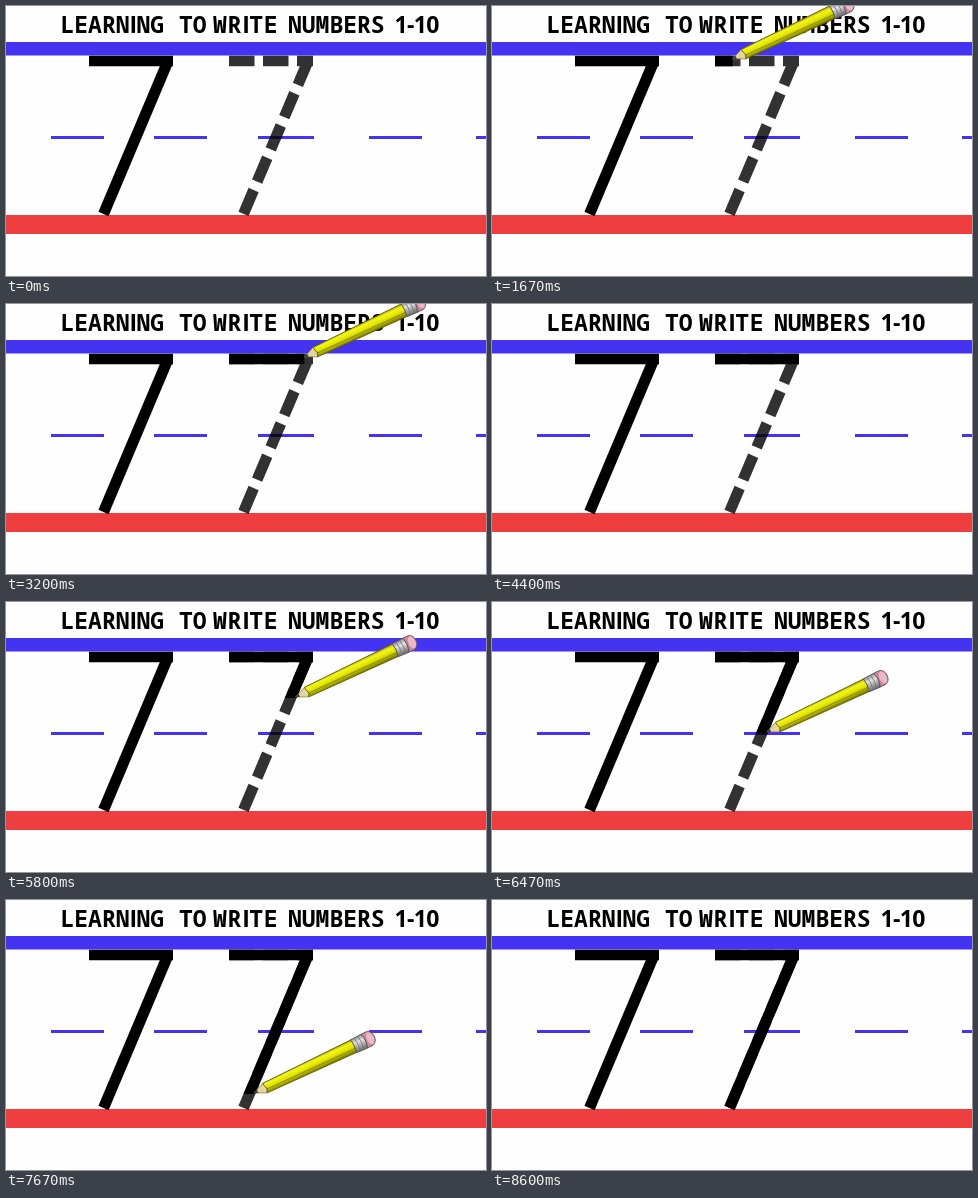
Recreate the animation shown at these times as an HTML page. Size 480 by 270 pixels, loop 8740 ms.

```html
<!DOCTYPE html>
<html lang="en">
<head>
<meta charset="utf-8">
<title>Writing the number 7</title>
<style>
  html, body { margin: 0; width: 100%; height: 100%; overflow: hidden; background: #fff; }
  svg { display: block; width: 100vw; height: 100vh; }
  .title { font: 600 23px "Noto Sans Mono", monospace; }
  .title .bold { font-weight: 700; }
  .title .sans { font-family: "Open Sans", sans-serif; font-weight: 700; letter-spacing: -.6px; }
  .seven path { fill: none; stroke: #000; }
</style>
</head>
<body>
<svg viewBox="0 0 480 270">
  <defs>
    <path id="bar" d="M83 55H167" stroke-width="10.5"/>
    <path id="slant" d="M162 55L97.5 208" stroke-width="11"/>
    <clipPath id="barClip"><rect id="barWipe" x="215" y="45" width="0" height="20"/></clipPath>
    <clipPath id="slantClip"><rect id="slantWipe" x="215" y="45" width="110" height="0"/></clipPath>
    <linearGradient id="paint" x2="0" y2="1">
      <stop offset="0" stop-color="#a5a400"/>
      <stop offset=".22" stop-color="#f4f51c"/>
      <stop offset=".5" stop-color="#e3e600"/>
      <stop offset=".72" stop-color="#b5b600"/>
      <stop offset="1" stop-color="#686700"/>
    </linearGradient>
    <linearGradient id="metal" x2="0" y2="1">
      <stop offset="0" stop-color="#8a8a8a"/>
      <stop offset=".35" stop-color="#e4e4e4"/>
      <stop offset="1" stop-color="#626262"/>
    </linearGradient>
  </defs>

  <rect width="480" height="270" fill="#fefefe"/>
  <rect y="36" width="480" height="13.5" fill="#4433f0"/>
  <rect y="209" width="480" height="19" fill="#ee3e40"/>
  <path d="M45 131.5H98M148 131.5H201M252 131.5H308M363 131.5H416M470 131.5H480" stroke="#4433f0" stroke-width="3"/>

  <g class="title">
    <text x="54.5" y="26.5">LEARN<tspan class="sans">I</tspan>NG</text>
    <text x="173" y="26.5">TO</text>
    <text x="207" y="26.5" letter-spacing=".8">WR<tspan class="sans">I</tspan>TE</text>
    <text x="282" y="26.5" class="bold">NUMBERS</text>
    <text x="388.5" y="26.5" class="sans">1-10</text>
  </g>

  <g class="seven" stroke="#000">
    <use href="#bar"/><use href="#slant"/>
  </g>
  <g class="seven" stroke="#000" opacity=".8">
    <use href="#bar" x="140" stroke-dasharray="25.5 8.5"/>
    <use href="#slant" x="140" stroke-dasharray="26 9"/>
  </g>
  <g class="seven" stroke="#000">
    <g clip-path="url(#barClip)"><use href="#bar" x="140"/></g>
    <g clip-path="url(#slantClip)"><use href="#slant" x="140"/></g>
  </g>

  <g id="pencil" visibility="hidden" stroke-linejoin="round">
    <path d="M0 0L12 -5L14 0L12 5.5Z" fill="#e6d59a" stroke="#77704a" stroke-width=".6"/>
    <path d="M0 0L4 -1.6V1.8Z" fill="#3c3c3c"/>
    <path d="M12 -5L111 -6.8V7L12 5.5L14 2L12.5 -1.5Z" fill="url(#paint)" stroke="#5c5b0c" stroke-width=".8"/>
    <path d="M14 2L111 2.8" stroke="#858500" stroke-width=".8"/>
    <path d="M110 -7L122 -7.6Q124.500 0 122 7.800L110 7.200Q112 0 110 -7Z" fill="url(#metal)" stroke="#555" stroke-width=".8"/>
    <path d="M114 -7Q116 0 114 7.200M118 -7.200Q120 0 118 7.400" fill="none" stroke="#777" stroke-width=".8"/>
    <path d="M122 -7.600H128Q133 -6 133 0T128 7.600H122Q124.500 0 122 -7.600Z" fill="#c98a9a" stroke="#5f5055" stroke-width=".8"/>
    <ellipse cx="128.500" cy="0" rx="3.600" ry="6.300" fill="#eab9c5"/>
  </g>
</svg>
<script>
  const LOOP = 8740, FPS = 15;
  const strokes = [
    { start: 1200, end: 3430, from: [223, 53], to: [307, 53] },
    { start: 5000, end: 8000, from: [307.5, 53], to: [240.5, 210.5] }
  ];
  const byId = id => document.getElementById(id);
  const pencil = byId("pencil"), barWipe = byId("barWipe"), slantWipe = byId("slantWipe");
  const mix = (a, b, p) => a + (b - a) * p;

  function tipAt(stroke, t) {
    const p = Math.min(1, Math.max(0, (t - stroke.start) / (stroke.end - stroke.start)));
    return stroke.from.map((v, i) => mix(v, stroke.to[i], p));
  }

  function draw(time) {
    // Motion advances in steps of 1/15 s
    const t = Math.floor((time % LOOP + 4) * FPS / 1000) * 1000 / FPS;
    const [across, down] = strokes.map(s => tipAt(s, t));
    barWipe.setAttribute("width", t > strokes[0].start ? across[0] - 215 : 0);
    slantWipe.setAttribute("height", t > strokes[1].start ? down[1] + 1 - 45 : 0);

    const active = strokes.find(s => t > s.start && t < s.end);
    pencil.setAttribute("visibility", active ? "visible" : "hidden");
    if (active) pencil.setAttribute("transform", `translate(${tipAt(active, t)}) rotate(-25.2)`);
  }

  const begin = performance.now();
  function tick() {
    draw(performance.now() - begin);
    requestAnimationFrame(tick);
  }
  tick();
</script>
</body>
</html>
```
